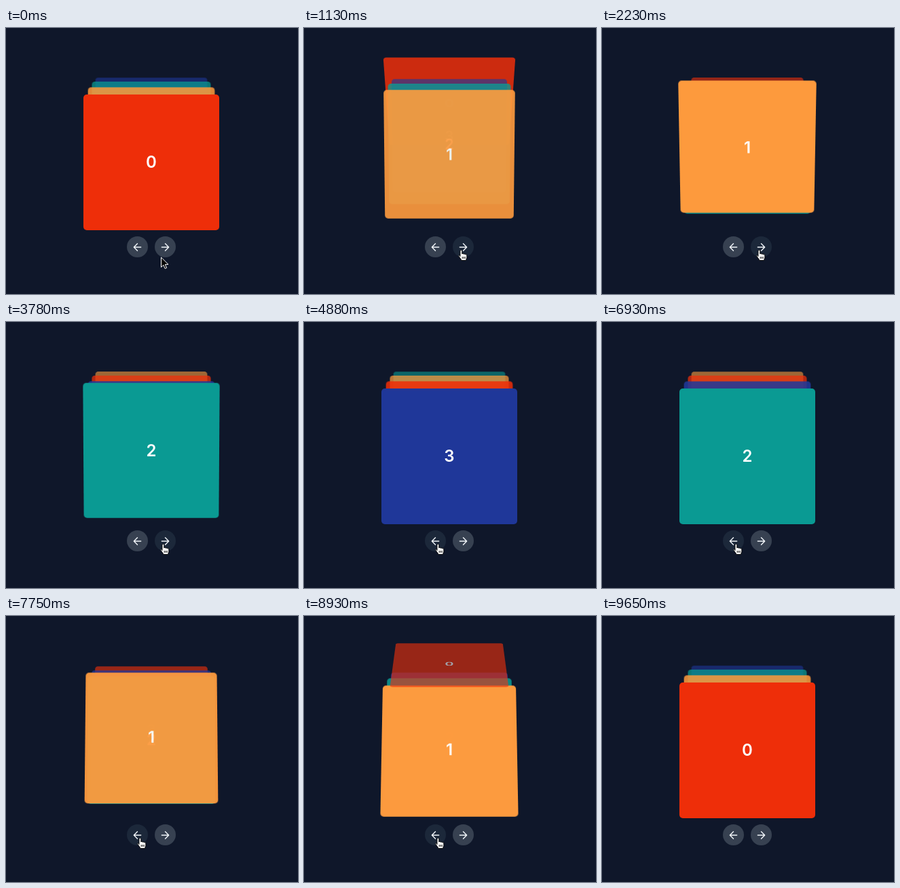
Animation, 430 px wide and 392 px high, one loop 9.8 s. Source, as an HTML page:

```html
<!DOCTYPE html>
<html lang="en">
<head>
<meta charset="utf-8">
<title>Card stack</title>
<style>
html, body { margin: 0; width: 100%; height: 100%; overflow: hidden; background: #0f172a; }
#stack { position: absolute; left: 114px; top: 98px; width: 200px; height: 200px; perspective: 1400px; }
.card {
  position: absolute; inset: 0; border-radius: 5px; color: #fff; text-align: center;
  font: 600 24px/200px Inter, sans-serif;
}
svg { position: absolute; left: 0; top: 0; z-index: 9; }
.icon { fill: none; stroke: #f1f5f9; stroke-width: 1.9; stroke-linecap: round; stroke-linejoin: round; }
</style>
</head>
<body>
<div id="stack"></div>
<svg width="430" height="392">
  <circle class="button" cx="193.5" cy="322.5" r="15.5"/>
  <circle class="button" cx="234.5" cy="322.5" r="15.5"/>
  <path class="icon" transform="translate(193.5 323) scale(-.74 .74)" d="M-7 0H7M0-7L7 0L0 7"/>
  <path class="icon" transform="translate(234.5 323) scale(.74)" d="M-7 0H7M0-7L7 0L0 7"/>
  <g id="cursor">
    <path id="arrow" fill="#000" stroke="#fff" d="M0 0V14.500l3.400-3.200 2.300 5.200 2.400-1-2.300-5.100h4.700z"/>
    <g id="hand" stroke="#000" stroke-width=".9" stroke-linejoin="round">
      <path fill="#fff" d="M-1.500 9V1.200a1.400 1.400 0 0 1 2.800 0V5.500c.5-.9 2.300-.8 2.500.4.6-.8 2.200-.6 2.400.6.800-.7 2.100-.3 2.100 1V10c0 2-1 2.800-1.200 5H.3C0 13-2 11.500-3.600 8.800c-.8-1.400.8-2.300 2.100.2z"/>
      <path fill="none" d="M1.700 9.500v3M3.700 9.500v3M5.700 9.500v3"/>
    </g>
  </g>
</svg>
<script>
const LOOP = 9800, DURATION = 1010, TILT = 15;
const colors = ['#ee2e09', '#fd9a3d', '#0a9a93', '#1f3799'];
const slotY = [0, -18.5, -36, -51.5];
// [start, direction]
const moves = [[518, 1], [2018, 1], [3650, 1], [5468, -1], [6918, -1], [8418, -1]];
// [time, x, y] of the pointer tip
const path = [
  [0, 228.5, 338], [379.9, 228.5, 338], [380, 231.5, 327.5], [4580, 231.5, 327.5],
  [4730, 197.5, 327.5], [9430, 197.5, 327.5], [9640, 341, 333]
];

const $ = id => document.getElementById(id);
const buttons = document.querySelectorAll('.button');
const cards = colors.map((color, i) => {
  const el = document.createElement('div');
  el.className = 'card';
  el.textContent = i;
  el.style.background = color;
  return $('stack').appendChild(el);
});

const mix = (a, b, p) => a + (b - a) * p;
const ease = t => t < .5 ? 2 * t * t : 1 - 2 * (1 - t) ** 2;
const wrap = n => (n + 4) % 4;
const pose = (slot, y = slotY[slot], tilt = 0) => [y, -100 * slot, tilt, 1 - slot * .4 / 3];

function drawCards(time) {
  let front = 0, dir = 1, p = 0;
  for (const [start, d] of moves) {
    if (time < start) break;
    if (time >= start + DURATION) { front = wrap(front + d); continue; }
    dir = d;
    p = ease((time - start) / DURATION);
  }
  cards.forEach((card, i) => {
    const from = wrap(i - front), to = wrap(from - dir);
    const flies = Math.abs(to - from) === 3;
    const middle = !flies ? pose(from, slotY[from], -dir * TILT)
      : dir > 0 ? pose(0, -120, -80) : pose(3, -158.6, 64);
    const [a, b, q] = p < .5 ? [pose(from), middle, p * 2] : [middle, pose(to), p * 2 - 1];
    const [y, z, tilt, opacity] = a.map((v, n) => mix(v, b[n], q));
    const swapped = p > (dir > 0 ? .5 : .45);
    card.style.transform = `translate3d(0,${y}px,${z}px) rotateX(${tilt}deg)`;
    card.style.opacity = opacity;
    card.style.zIndex = 4 - (swapped ? to : from);
  });
}

function drawCursor(time) {
  const n = path.findIndex(k => k[0] > time);
  const visible = n > 0;
  let x = -99, y = -99;
  if (visible) {
    const [a, b] = [path[n - 1], path[n]];
    const p = (time - a[0]) / (b[0] - a[0]);
    x = mix(a[1], b[1], p);
    y = mix(a[2], b[2], p);
  }
  const pointing = time >= 380 && time < 4580 || time >= 4880 && time < 9430;
  $('cursor').setAttribute('transform', `translate(${x} ${y})`);
  $('hand').style.display = pointing ? '' : 'none';
  $('arrow').style.display = pointing ? 'none' : '';
  buttons.forEach(b => {
    const hover = Math.hypot(x - b.getAttribute('cx'), y - b.getAttribute('cy')) < 15.5;
    b.setAttribute('fill', hover ? '#1c283a' : '#374151');
  });
}

const origin = performance.now();
function frame() {
  const time = (performance.now() - origin) % LOOP;
  drawCards(time);
  drawCursor(time);
  requestAnimationFrame(frame);
}
frame();
</script>
</body>
</html>
```
